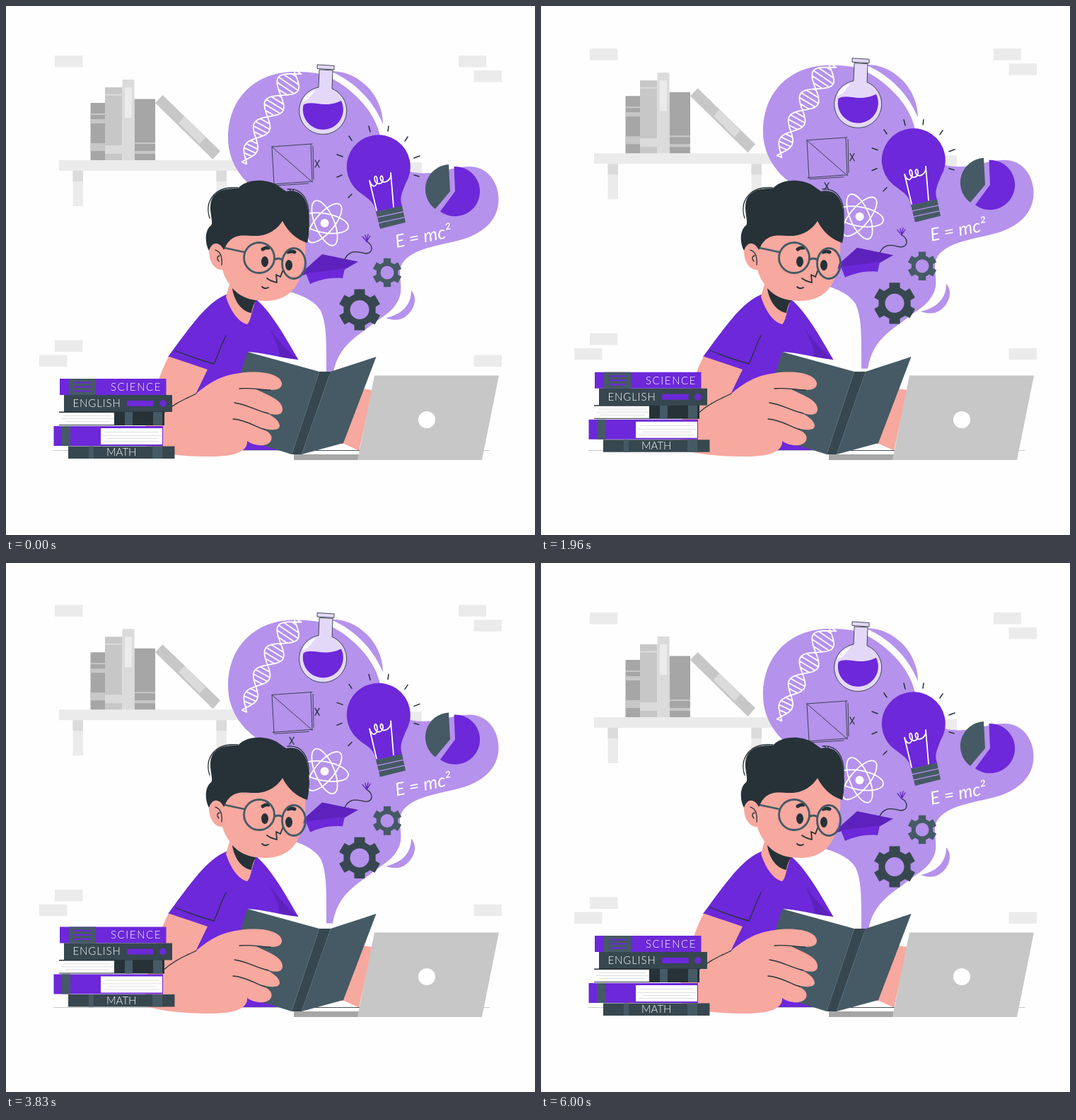
An HTML page that plays this animation: 748x748 px, repeating every 6040 ms.

```html
<!DOCTYPE html>
<html lang="en">
<head>
<meta charset="utf-8">
<title>Reading</title>
<style>
html, body { margin: 0; width: 100%; height: 100%; overflow: hidden; background: #fefefe; }
svg { display: block; width: 100vw; height: 100vh; }
.p { fill: #6c28d9; } .lilac { fill: #b592ec; } .skin { fill: #f7a89f; }
.ink { fill: #263238; } .slate { fill: #455a64; } .deep { fill: #37474f; }
.g1 { fill: #ebebeb; } .g2 { fill: #dbdbdb; } .g3 { fill: #c7c7c7; } .g4 { fill: #a6a6a6; } .w { fill: #fff; }
.line { fill: none; stroke: #263238; stroke-width: 1.3; stroke-linecap: round; stroke-linejoin: round; }
.thin { stroke-width: .85; }
.chalk { fill: none; stroke: #fff; stroke-width: 1.8; stroke-linecap: round; stroke-linejoin: round; }
text { font-family: Lato, "Open Sans", sans-serif; fill: #fff; }
.title { font-weight: 300; font-size: 15px; }
</style>
</head>
<body>
<svg viewBox="0 0 748 748" xmlns="http://www.w3.org/2000/svg">
<g id="wall">
  <path class="g1" d="M69 70h39.5v16.5H69zM640 70h39v16.5h-39zM661.5 91H701v16.5h-39.5zM69 472.5h39.5V489H69zM47 493.5h39.5V510H47zM661.5 493.5H701V510h-39.5zM549 221h39v16.5h-39z"/>
  <path class="g1" d="M75 218h257v15H75zM94.5 233H109v50H94.5zM297.5 233H312v50h-14.5z"/>
  <path class="g2" d="M94.5 233H109v15H94.5zM297.5 233H312v15h-14.5z"/>
  <path class="g4" d="M119.5 137H140v81h-20.5zM181.5 131.5H211V218h-29.5z"/>
  <path class="g3" d="M140 115h24.5v103H140zM119.5 152H140v2h-20.5zM119.5 160H140v6h-20.5zM119.5 194H140v11h-20.5zM181.5 193H211v2h-29.5zM181.5 205H211v4h-29.5z"/>
  <path class="g2" d="M164.5 104h17v114h-17zM140 124.5h24.5v2H140zM140 197h24.5v12H140z"/>
  <path class="g1" d="M168 115h10v43h-10z"/>
  <path class="g3" d="M211 137L221.5 126 303 205 292.5 217z"/>
  <path class="g2" d="M244 165L252.5 156 282 186 273.5 195z"/>
</g>

<g id="cloud">
  <path class="lilac" d="M453 522C453 480 454 450 445 431C436 416 418 409 398 403C360 370 385 290 350 257C328 240 314 215 314 187C314 129 354 93 408 93C425 93 437 94 447 97C480 108 518 142 528 180C533 208 546 232 581 236C612 239 630 227 655 227C681 227 696.5 249 696.5 274C696.5 304 672 324 638 332C605 340 567 345 558 369C554 384 564 402 553 419C545 434 530 440 517 451C492 470 469 482 462 522z"/>
  <path class="lilac" d="M458 92C500 91 533 128 533 167C520 136 496 108 458 92zM573 402C584 415 575 432 565 439C557 445 546 445 537 441C556 437 573 426 573 402z"/>
  <path id="dna" class="chalk"/>

  <g stroke="#263238" stroke-width=".85">
    <path fill="#e4d8f8" d="M443 90L442 115A33.500 33.500 0 1 0 461 117L462 91z"/>
    <path fill="#e4d8f8" d="M440 83L464 84.500V90L440 88.500z"/>
  </g>
  <path class="p" d="M420.500 140C434 132 448 146 474 134A28.500 28.500 0 1 1 420.500 140z"/>
  <path class="w" d="M420 132C424 125 430 121 438 119L426 133L420 136z" opacity=".85"/>

  <path class="line thin" d="M376 199L433 195M431 196L433 249M434 198L435 245M377 252L433 248M380 254L428 251M376 199L379 253M377 200L431 247"/>
  <path class="line" d="M437 218L443 228M443 218L437 228M401 259L407 269M407 259L401 269"/>

  <g class="chalk">
    <ellipse cx="450.500" cy="307" rx="34" ry="13.500" transform="rotate(10 450.500 307)"/>
    <ellipse cx="450.500" cy="307" rx="34" ry="13.500" transform="rotate(67 450.500 307)"/>
    <ellipse cx="450.500" cy="307" rx="34" ry="13.500" transform="rotate(-50 450.500 307)"/>
  </g>
  <circle class="w" cx="450.500" cy="307" r="6"/>

  <path class="p" d="M523 291C521 275 507 270 497 261A45 45 0 1 1 565 251C560 264 556 271 560 283z"/>
  <path class="slate" d="M523 291L560 282.500 565 306 529 315z"/>
  <path class="chalk" style="stroke-width:1.300;stroke:#b592ec" d="M525 299L562 291M527 307L563 299"/>
  <path class="chalk" d="M524 289L514 247C519 262 528 252 524 242C521 237 519 247 525 251C533 253 535 243 531 240C528 241 529 250 536 249C543 247 545 240 544 236L548 284"/>
  <path class="line" style="stroke-width:1.500" d="M485 184L489 190M513 170L515 178M541 170L540 177M568 185L564 191M585 212L577 215M584 241L577 239M468 210L476 213M468 242L475 239M484 271L489 266"/>

  <path class="p" d="M633.500 227A35.200 35.200 0 1 1 614 290.500L635 262z"/>
  <path class="slate" d="M626 224A35 35 0 0 0 607 287L628 262z"/>
  <text x="552" y="342" font-size="25.500" font-style="italic" transform="rotate(-11 552 342)">E = mc²</text>

  <path fill="#5d22bd" d="M410 384L447 351 498 361.500 478 373 425 379z"/>
  <path class="p" d="M424 378L479 371 476 385C456 383 442 388 430 393z"/>
  <path class="line" d="M479 358C487 342 500 349 509 350C520 349 519 338 510 333"/>
  <path class="line" style="stroke:#5d22bd" d="M510 333L504 326M510 333L508 324M510 333L512 323M510 333L515 325"/>
  <path id="gearSmall" class="slate" fill-rule="evenodd"/>
  <path id="gearBig" class="deep" fill-rule="evenodd"/>
</g>

<path d="M67 628.500H684" stroke="#b8bcbe" stroke-width=".8"/>

<g id="reader">
  <path class="p" d="M314 407C287 417 268 443 229 496L284 515L268 549L300 628H390L386 497L414 501C398 474 377 435 355 416z"/>
  <path class="p" d="M284 513L295 518L300 540L268 549z"/>
  <path fill="#5d22bd" d="M373 456C384 472 398 488 413 500L386 496C388 486 380 472 373 456z"/>
  <path class="line" d="M239 487C258 495 276 501 294 506C300 493 304 480 311 466"/>
  <path class="skin" d="M320 380L311 411C317 430 328 447 341 450C347 445 347 429 354 415z"/>
  <path class="ink" d="M320 399C330 410 342 415 354 416C350 421 348 427 347 434C333 432 322 416 320 399z"/>
  <path class="skin" d="M305 320C297 328 287 331 287 346C287 364 297 374 306 373C313 399 336 417 367 417C394 417 411 402 417 380C424 360 425 340 421 315L390 290z"/>
  <path class="ink" d="M287 346C281 335 281 318 289 311C295 308 286 290 290 276C294 262 308 257 328 258C338 245 366 243 383 253C389 257 393 260 396 262C414 258 425 270 427 289C430 303 429 324 426 335C410 330 398 318 391 304C384 315 371 325 354 325C340 326 324 319 312 337L308 345C303 334 292 331 287 346z"/>
  <path class="line" d="M288 300C281 279 292 254 328 257M398 259C419 257 429 274 428 299"/>
  <path class="line" d="M296 345C303 347 306 355 305 366M302 353C298 354 298 358 301 361"/>
  <ellipse class="ink" cx="366" cy="361.500" rx="5" ry="7.500"/>
  <ellipse class="ink" cx="400" cy="366.500" rx="5" ry="7.500"/>
  <path class="line" style="stroke-width:5" d="M363 344Q367 341 371 342M399 348Q404 346 408 348"/>
  <g fill="none" stroke="#455a64" stroke-width="2.800">
    <circle cx="358" cy="356" r="21.500"/>
    <ellipse cx="407" cy="364" rx="16.500" ry="21.500"/>
    <path d="M379 359Q385 355 391 359M309 342L337 348"/>
  </g>
  <path class="line" style="stroke-width:1.800" d="M369 385C374 389 379 390 383 391L382 380L388 383L391 375M362 397Q366 401 371 398"/>

  <path class="w" d="M341 489C365 490 385 497 412 500C425 503 437 508 445 517L440 524z"/>
  <path class="skin" d="M505 541L518 543L499 629L474 619z"/>
  <path class="w" d="M420 634L478 619L500 629V635z"/>
  <path class="line thin" d="M438 628.500H500"/>
  <path class="g4" d="M407 634H588V642H407z"/>
  <path class="slate" d="M341 489L443 517L404 634L305 603zM459 517L523.500 496L477 618L418 634z"/>
  <path class="deep" d="M443 517H459L418 634H404z"/>

  <path class="skin" d="M230 495.500C216 522 205 560 196 600L199 627C225 635 260 637 290 637C328 637 342 628 341 615C352 623 371 624 375 614C378 605 368 600 358 596C373 600 386 601 387 594C387 585 374 578 365 574C381 580 392 579 391 569C390 556 367 549 352 541C374 544 391 545 390 533C387 519 357 515 331 519C304 522 285 534 268 549L285 514z"/>
  <path class="line" d="M222 576C240 560 254 556 269 548M330 541C347 539 358 543 374 543M323 561C340 563 355 573 371 576M321 584C340 585 354 596 366 599"/>
  <path class="g3" d="M521 522.500H697L673 642H497z"/>
  <circle class="w" cx="595" cy="585" r="12"/>
</g>

<g id="stack">
  <path class="p" d="M76 527H226.500V550H76z"/>
  <path class="slate" d="M89 527H127V550H89z"/>
  <path d="M96 532.500H120M96 538.500H120M96 544.500H120" stroke="#6c28d9" stroke-width="2.200"/>
  <text class="title" x="148" y="544" letter-spacing="1.600">SCIENCE</text>

  <path class="deep" d="M82 550H235V574H82z"/>
  <text class="title" x="94.500" y="567" letter-spacing=".9">ENGLISH</text>
  <path class="p" d="M171 558H208.500V566H171z"/>
  <circle class="p" cx="222" cy="562" r="4.700"/>

  <path class="ink" d="M75 573.500H224V593H75z"/>
  <path class="w" d="M75 575H153V592H75z"/>
  <path class="slate" d="M168 574H179V593H168zM208 574H221V593H208z"/>
  <path d="M82 579.500H149M78 583.500H153M84 587.500H147" stroke="#ddd" stroke-width="1"/>

  <path class="p" d="M67.500 594H222V622H67.500z"/>
  <path class="slate" d="M79 594H91V622H79z"/>
  <path class="w" d="M134 597H221V620H134z"/>
  <path d="M140 602.500H216M136 607.500H219M143 611.500H213M138 615.500H217" stroke="#ddd" stroke-width="1"/>

  <path class="deep" d="M88 622.500H238.500V640H88z"/>
  <path class="slate" d="M117 622.500H124V640H117zM207 622.500H221V640H207z"/>
  <text class="title" x="142" y="636.500">MATH</text>
</g>
</svg>
<script>
const LOOP = 6040;
const byId = id => document.getElementById(id);
const point = (x, y) => x.toFixed(1) + " " + y.toFixed(1);

function gear(cx, cy, outer, inner, hole, teeth = 6) {
  const step = Math.PI * 2 / teeth;
  const corners = [[-.32, inner], [-.24, outer], [.24, outer], [.32, inner]];
  const points = [];
  for (let i = 0; i < teeth; i++)
    for (const [turn, r] of corners) {
      const a = (i + turn) * step - Math.PI / 2;
      points.push(point(cx + r * Math.cos(a), cy + r * Math.sin(a)));
    }
  return `M${points.join("L")}zM${cx - hole} ${cy}a${hole} ${hole} 0 1 0 ${2 * hole} 0a${hole} ${hole} 0 1 0 ${-2 * hole} 0z`;
}

// Two strands twist about a curved axis; rungs join them.
function helix() {
  const at = (u, side) => {
    const s = u * 1.03 - .03;
    const x = 409 - 90 * s + 18 * s * s, y = 96 + 126 * s;
    const dx = -90 + 36 * s, dy = 126, len = Math.hypot(dx, dy);
    const reach = side * (18 - 10 * s) * Math.sin(Math.PI * 4.15 * s);
    return point(x + dy / len * reach, y - dx / len * reach);
  };
  const strand = side => "M" + Array.from({ length: 61 }, (_, i) => at(i / 60, side)).join("L");
  let d = strand(1) + strand(-1);
  for (let i = 0; i < 23; i++) d += `M${at(i / 22, 1)}L${at(i / 22, -1)}`;
  return d;
}

byId("dna").setAttribute("d", helix());
byId("gearSmall").setAttribute("d", gear(539, 377, 21, 15.5, 9.5));
byId("gearBig").setAttribute("d", gear(500, 429.5, 30, 23, 13.5));

const bounce = (t, period) => 1 - Math.abs(1 - 2 * (t % period) / period);
const lift = (id, y) => byId(id).setAttribute("transform", `translate(0 ${(-y).toFixed(2)})`);

function draw(t) {
  lift("wall", 15 * bounce(t, 6000));
  const rise = 15 * bounce(t + 20, 1500) - .4;
  lift("cloud", rise);
  lift("stack", rise);
}

const start = performance.now();
function tick() {
  draw((performance.now() - start) % LOOP);
  requestAnimationFrame(tick);
}
tick();
</script>
</body>
</html>
```
